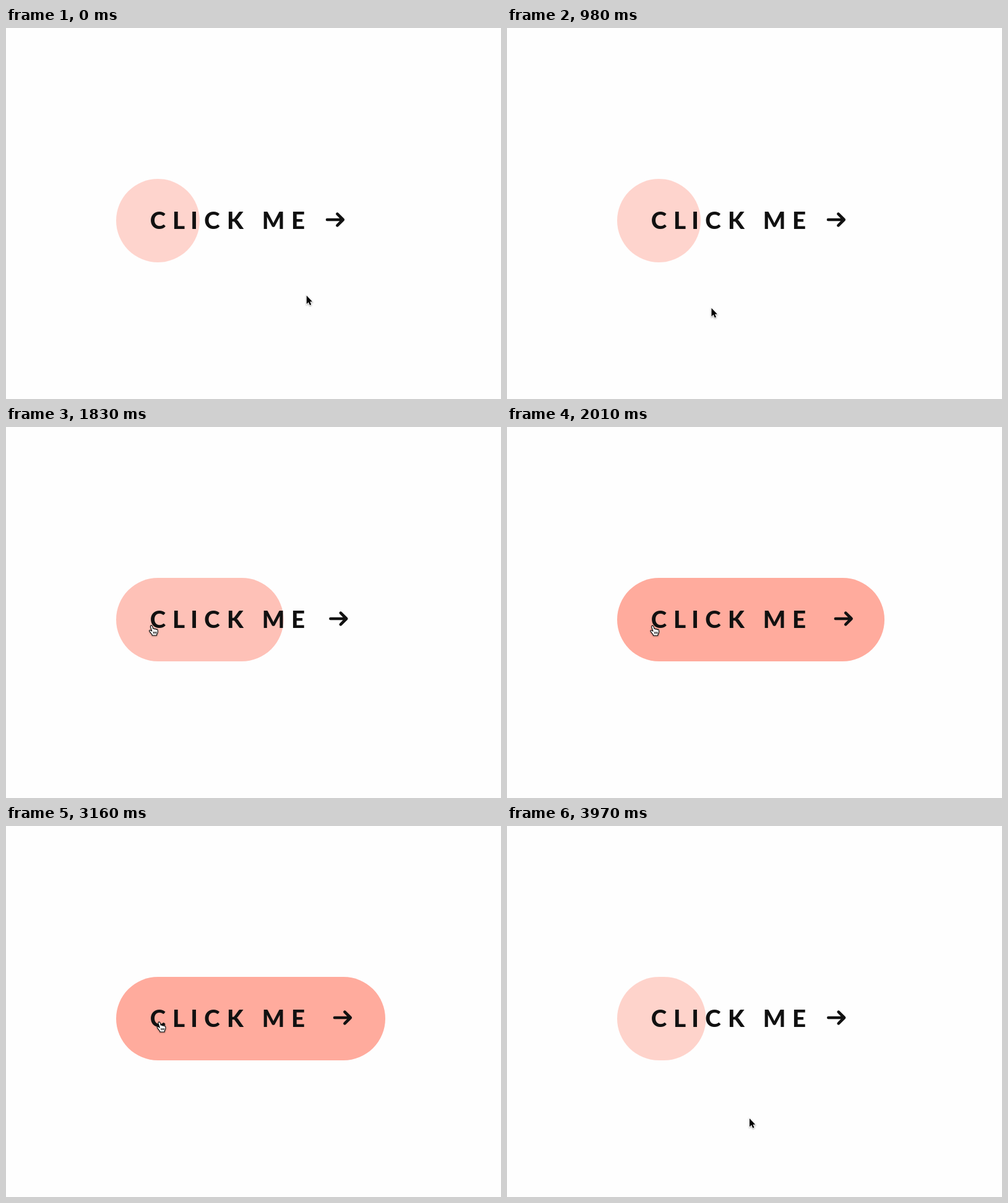
Write an HTML page that moves like this. It is 800 px wide and 600 px high and loops after 4070 ms.

```html
<!DOCTYPE html>
<html lang="en">
<head>
<meta charset="utf-8">
<title>Click me button</title>
<style>
  html, body { margin: 0; width: 100%; height: 100%; overflow: hidden; background: #fefefe; }
  svg { display: block; width: 800px; height: 600px; }
  text { font: 800 38.6px Lato, sans-serif; text-anchor: middle; fill: #111; }
  #arrow { fill: none; stroke: #111; stroke-width: 2; stroke-linecap: round; stroke-linejoin: round; }
  #cursor { filter: drop-shadow(0 1px 1px rgba(0, 0, 0, .35)); }
  #pointer { fill: #000; stroke: #fff; stroke-width: 1.6; paint-order: stroke; }
  #hand { fill: #fff; stroke: #000; stroke-width: 1.1; stroke-linejoin: round; }
</style>
</head>
<body>
<svg viewBox="0 0 800 600">
  <rect id="pill" x="178" y="244" height="135" rx="67.5" fill="rgb(255,171,157)"/>
  <text y="325.3" x="245.5 279 304 333 370.3 400 432 472">CLICK ME</text>
  <path id="arrow" d="M1 5H11M8 1L12 5L8 9"/>
  <g id="cursor">
    <path id="pointer" d="M.5 1V14.5L3.6 11.6L5.8 16.4L8 15.5L5.9 10.7H9.8Z"/>
    <g id="hand" transform="translate(-3 0)">
      <path d="M4 .9C2.5 .9 2.2 2.5 2.7 3.9L4.8 10.2C3.6 9.2 2 8 1 8.8C0 9.7 1 10.6 2 11.8L5.2 16V17H12.6V15.8C14 13.5 14.6 12 14.3 10L14 8C13.6 6.7 12 6.8 11.8 7.9C11.6 6.2 9.6 6 9.2 7.2C8.8 5.4 7 5.6 6.8 6.4L5.5 2.2C5.2 1.4 4.8 .9 4 .9Z"/>
      <path d="M7.4 11v3.2M9.5 11v3.2M11.6 11v3.2"/>
    </g>
  </g>
</svg>
<script>
const LOOP = 4070, STEP = 90, ENTER = 1719, LEAVE = 3732;
const [pill, arrow, cursor, pointer, hand] =
  ['pill', 'arrow', 'cursor', 'pointer', 'hand'].map(id => document.getElementById(id));

// Key points of the cursor: [time, x, y]
const route = [
  [0, 485.3, 431.8], [720, 438, 456], [900, 330, 452], [1260, 275.5, 431.5],
  [1620, 243, 384], [1710, 231, 327], [1800, 234, 320], [2520, 235, 321],
  [2880, 247.5, 314.5], [3330, 246, 317], [3690, 325, 372], [3780, 387.5, 472],
  [3870, 391.5, 472], [LOOP, 391.5, 472]
];

const mix = (a, b, k) => a + (b - a) * k;

// The CSS "ease" curve: cubic-bezier(.25, .1, .25, 1)
function ease(t) {
  if (t <= 0) return 0;
  if (t >= 1) return 1;
  let low = 0, high = 1, u;
  for (let i = 0; i < 20; i++) {
    u = (low + high) / 2;
    if (.75 * u * (1 - u) + u ** 3 < t) low = u; else high = u;
  }
  return .3 * u * (1 - u) ** 2 + 3 * u * u * (1 - u) + u ** 3;
}

function cursorAt(t) {
  const i = route.findIndex(([time]) => time > t);
  const [t0, x0, y0] = route[i - 1], [t1, x1, y1] = route[i];
  const k = (t - t0) / (t1 - t0);
  return [mix(x0, x1, k), mix(y0, y1, k)];
}

function draw(t) {
  const hover = ease((t - ENTER) / 300) - ease((t - LEAVE) / 290);
  pill.setAttribute('width', mix(135, 435, hover));
  pill.setAttribute('fill-opacity', mix(.5, 1, hover));
  arrow.setAttribute('transform', `translate(${mix(516.7, 528.7, hover)} 298.3) scale(2.34)`);

  const [x, y] = cursorAt(t);
  const over = y < 379;
  cursor.setAttribute('transform', `translate(${x} ${y})`);
  hand.style.display = over ? '' : 'none';
  pointer.style.display = over ? 'none' : '';
}

const start = performance.now();
function tick() {
  const t = (performance.now() - start) % LOOP;
  draw(Math.floor(t / STEP) * STEP); // each pose holds for one step
  requestAnimationFrame(tick);
}
tick();
</script>
</body>
</html>
```
